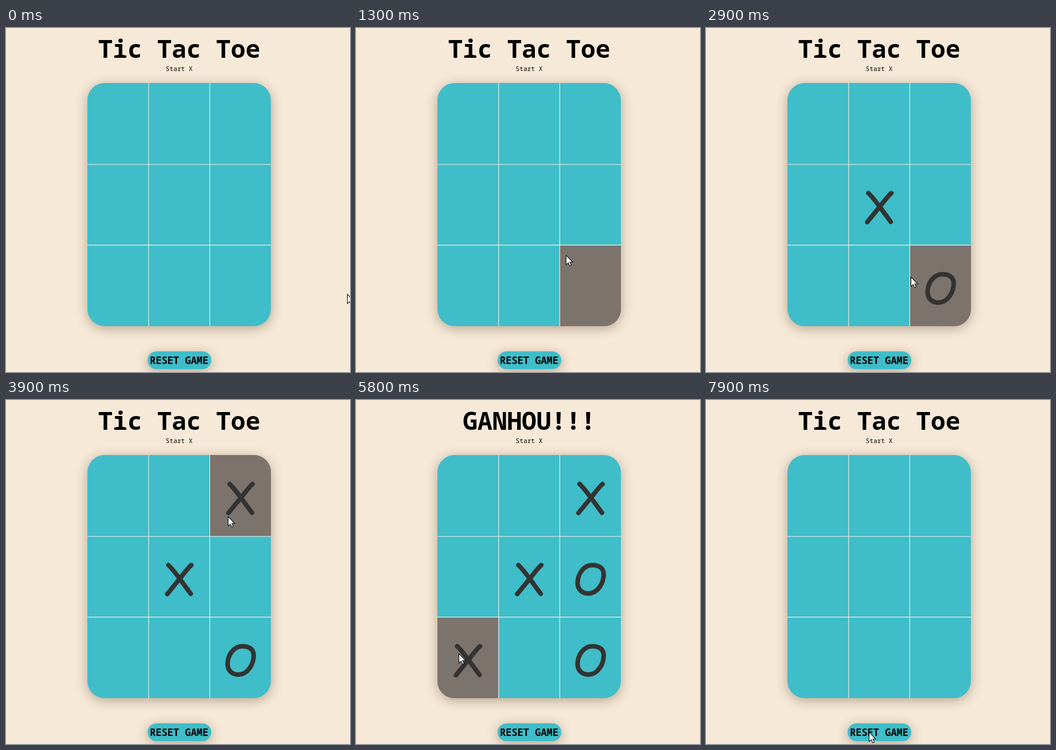
An HTML page that plays this animation: 600x600 px, repeating every 8 s.

```html
<!DOCTYPE html>
<html lang="en">
<head>
<meta charset="utf-8">
<title>Tic Tac Toe</title>
<style>
  html, body { margin: 0; width: 100%; height: 100%; overflow: hidden; background: #f6e9d8; }
  .panel { position: absolute; background: #3fbdc8; box-shadow: 0 4px 20px rgba(60, 35, 10, .35); }
  #board { left: 142px; top: 96px; width: 320.3px; height: 424.3px; border-radius: 30px; }
  #reset { left: 246.5px; top: 563.5px; width: 111px; height: 31.5px; border-radius: 16px; }
  svg { position: absolute; left: 0; top: 0; }
  text { font-family: "Noto Sans Mono", "DejaVu Sans Mono", monospace; text-anchor: middle; white-space: pre; }
  .bold { font-weight: 700; }
  #marks { fill: none; stroke: #333; stroke-width: 8; stroke-linecap: round; stroke-linejoin: round; }
</style>
</head>
<body>
<div class="panel" id="board"></div>
<div class="panel" id="reset"></div>
<svg width="600" height="600" viewBox="0 0 600 600">
  <clipPath id="round"><rect x="142" y="96" width="320.3" height="424.3" rx="30"/></clipPath>
  <g clip-path="url(#round)">
    <rect id="hover" width="106.8" height="141.4" fill="#7d736d"/>
    <path d="M248.8 96V521M355.4 96V521M142 238H463M142 378.6H463" stroke="#f3f1e8" stroke-width="1.1"/>
  </g>
  <text id="title" class="bold" x="302" y="52" font-size="42.9"></text>
  <text x="302" y="75" font-size="11.2">Start X</text>
  <text class="bold" x="302" y="586" font-size="17">RESET GAME</text>
  <g id="marks"></g>
  <path id="cursor" d="M0 0V16.3L3.8 12.8 6.3 18.4 8.9 17.3 6.5 11.8H11.6Z" fill="#fff" stroke="#111" stroke-width="1.1"/>
</svg>
<script>
// all times are in ticks of 100 ms
const TICK = 100, LOOP = 80, CLEAR = 72, RENAME = 73;
const clicks = [17, 21, 34, 50, 56];
const WIN = clicks[clicks.length - 1];

const LEFT = 142, TOP = 96, CELL_W = 106.8, CELL_H = 141.4;

const shapes = [
  'M-19-25Q-14-21 1-1L20 25M21-25Q17-22 3-4L-21 25.5',
  'M3-25C-13-25-22.5-8-22.5 6C-22.5 18-14 24.5-4 24.5C13 24.5 23 6 23-9C23-20 15-25 3-25Z'
];

// pointer stops: tick, x, y
const stops = [
  [0, 596, 465], [5, 215, 200], [9, 300, 570], [13, 367, 397],
  [15, 318, 330], [17, 318, 330], [21, 392, 437], [23, 225, 215],
  [25, 365, 495], [27, 340, 566], [32, 392, 195], [39, 388, 204],
  [43, 388, 204], [46, 223, 30], [49, 395, 400], [51, 380, 303],
  [56, 181, 443], [63, 177, 445], [72, 287, 581], [LOOP, 285, 580]
];

const $ = id => document.getElementById(id);
const attr = (el, values) => {
  for (const key in values) el.setAttribute(key, values[key]);
};
const show = (el, on) => { el.style.visibility = on ? 'visible' : 'hidden'; };

function pointer(t) {
  const i = stops.findIndex(s => s[0] > t);
  const [t0, x0, y0] = stops[i - 1], [t1, x1, y1] = stops[i];
  const u = (t - t0) / (t1 - t0), k = u * u * (3 - 2 * u);
  return [x0 + (x1 - x0) * k, y0 + (y1 - y0) * k].map(Math.round);
}

const cellAt = (x, y) => [Math.floor((x - LEFT) / CELL_W), Math.floor((y - TOP) / CELL_H)];

// players take turns, each mark lands in the cell under the pointer
const marks = clicks.map((at, turn) => {
  const [col, row] = cellAt(...pointer(at));
  const el = document.createElementNS('http://www.w3.org/2000/svg', 'path');
  attr(el, {
    d: shapes[turn % 2],
    transform: `translate(${302.2 + (col - 1) * CELL_W} ${313 + (row - 1) * CELL_H})`
  });
  $('marks').append(el);
  return { el, at };
});

function draw() {
  const t = Math.floor(performance.now() / TICK) % LOOP;
  const [x, y] = pointer(t);
  attr($('cursor'), { transform: `translate(${x - .5} ${y - .5})` });

  const [col, row] = cellAt(x, y);
  attr($('hover'), { x: LEFT + col * CELL_W, y: TOP + row * CELL_H });
  show($('hover'), [col, row].every(n => n >= 0 && n < 3));

  for (const { el, at } of marks) show(el, t >= at && t < CLEAR);
  $('title').textContent = t >= WIN && t < RENAME ? 'GANHOU!!!' : 'Tic Tac Toe';
  requestAnimationFrame(draw);
}
draw();
</script>
</body>
</html>
```
